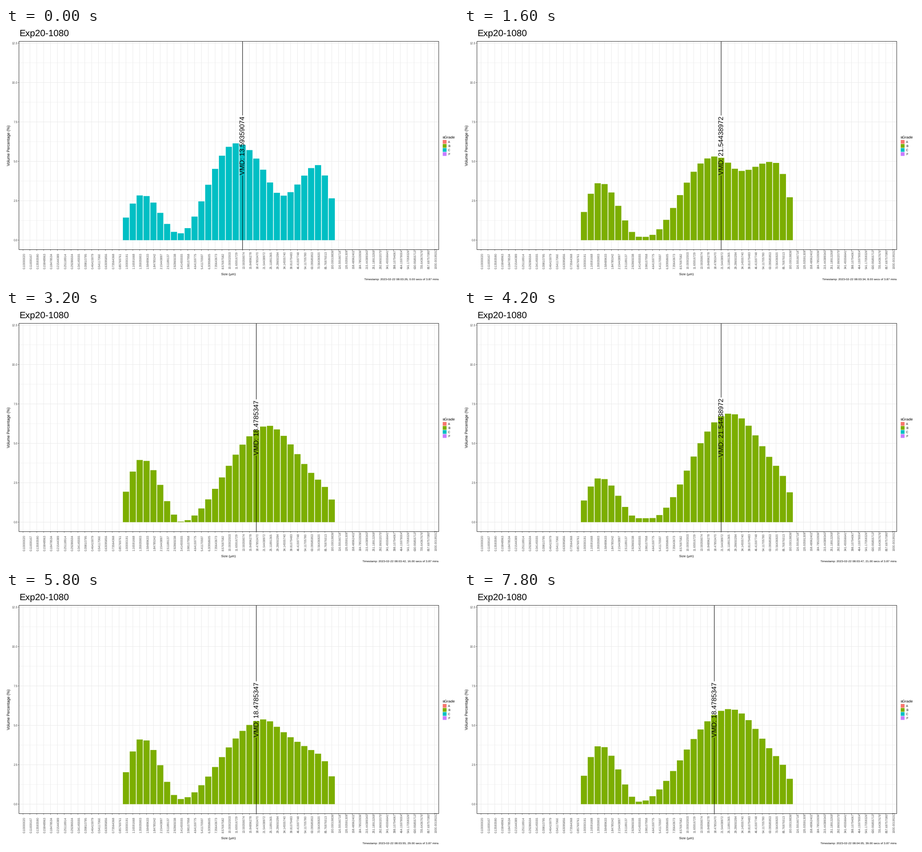
Recreate the animation shown at these times as a matplotlib script. Size 998 px wide and 561 px high, loop 8000 ms.

```python
import numpy as np
import matplotlib.pyplot as plt
from matplotlib.animation import FuncAnimation
from matplotlib.patches import Rectangle

W, H, DPI = 998, 561, 100
PX = 72 / DPI                                   # points per pixel
LEFT, RIGHT, TOP, BOTTOM = 28.6, 955.5, 29.5, 489.5
STEP = (RIGHT - LEFT) / 61.2
MIDDLE = (TOP + BOTTOM) / 2
ZERO, UNIT = 468.6, 34.82
FIRST, BARS = 15, 31
GRADES = {"A": "#F8766D", "B": "#7CAE00", "C": "#00BFC4", "F": "#C77CFF"}

plt.rcParams["font.family"] = ["Liberation Sans", "DejaVu Sans"]
plt.rcParams["text.hinting"] = "none"

# Size classes: 15 per decade, kept in single precision
SIZES = np.float32(10 ** (np.arange(61) / 15 - 1) * (1 + 1.96e-6))

# second, fine peak, main peak, main centre, main reach, coarse peak, haze
KEYS = np.array([
    [0, 2.85, 6.13, 16.1, 9.0, 4.75, 0.4],
    [4, 4.00, 3.95, 17.2, 8.6, 8.10, 0.0],
    [12, 3.30, 7.17, 20.3, 11.3, 1.60, 0.4],
    [16, 4.00, 6.12, 20.8, 13.0, 2.60, 0.0],
    [21, 2.80, 6.88, 21.2, 12.0, 3.40, 0.25],
    [29, 4.15, 5.37, 20.2, 13.3, 3.15, 0.3],
    [39, 3.72, 6.03, 21.2, 13.7, 2.90, 0.15],
])


def lobe(peak, centre, left, right):
    """Raised-cosine hump reaching zero at centre - left and centre + right."""
    d = np.arange(BARS) - centre
    d = np.clip(d / np.where(d < 0, left, right), -1, 1)
    return peak * (1 + np.cos(np.pi * d)) / 2


def mix(fine, main, centre, reach, coarse, haze):
    total = (lobe(fine, 2.35, 4.6, 6.0)
             + lobe(main, centre, reach, 22.4 - 0.7 * centre)
             + lobe(coarse, 27.9, 6.8, 4.5))
    return np.hypot(total, haze)


SHAPES = np.array([mix(*key[1:]) for key in KEYS])

fig = plt.figure(figsize=(W / DPI, H / DPI), dpi=DPI, facecolor="white")
ax = fig.add_axes([0, 0, 1, 1])
ax.set(xlim=(0, W), ylim=(H, 0))
ax.axis("off")


def xpos(i):
    return LEFT + (0.6 + i) * STEP


def ypos(v):
    return ZERO - v * UNIT


def line(xs, ys, color, width, z):
    return ax.plot(xs, ys, color=color, lw=width * PX, zorder=z,
                   solid_capstyle="butt", snap=False)[0]


def box(x, y, w, h, **style):
    return ax.add_patch(Rectangle((x, y), w, h, snap=False, **style))


def text(x, y, s, size, ha="left", color="black", rot=0):
    return ax.text(x, y, s, fontsize=size * PX, ha=ha, va="baseline",
                   color=color, rotation=rot, rotation_mode="anchor", zorder=6)


# Grid, ticks and tick labels
for k in range(11):
    y = ypos(k * 1.25)
    major = k % 2 == 0
    line([LEFT, RIGHT], [y, y], "#ebebeb", 1 if major else 0.6, 1)
    if major:
        line([26.7, LEFT], [y, y], "#333333", 0.8, 1)
        text(26, y + 2.5, f"{k * 1.25:.1f}", 6.8, "right", "#4d4d4d")
for i, size in enumerate(SIZES):
    x = xpos(i)
    line([x, x], [TOP, BOTTOM], "#ebebeb", 1, 1)
    line([x, x], [BOTTOM, BOTTOM + 2], "#333333", 0.8, 1)
    text(x + 4.7, 532, f"{size:.8f}", 6.6, color="#4d4d4d", rot=90)
box(LEFT, TOP, RIGHT - LEFT, BOTTOM - TOP, fill=False, ec="#333333", lw=PX,
    zorder=5)

# Titles and legend
text(29, 19, "Exp20-1080", 20.4)
text(491.5, 545.5, "Size (µm)", 7.5, "center")
text(9.6, MIDDLE, "Volume Percentage (%)", 8.57, "center", rot=90)
text(964, 244, "sGrade", 8.5)
for k, (name, color) in enumerate(GRADES.items()):
    y = 247.3 + 9 * k
    box(964.3, y, 8.4, 8.2, fc=color, lw=0)
    text(976, y + 6.7, name, 6.6)

# Moving parts
bars = [box(xpos(FIRST + i) - 0.45 * STEP, ZERO, 0.9 * STEP, 0, lw=0, zorder=3)
        for i in range(BARS)]
upper = line([0, 0], [0, 0], "black", 1, 4)
lower = line([0, 0], [0, 0], "black", 1, 4)
vmd = text(0, MIDDLE, "", 15, "center", rot=90)
stamp = text(955.5, 556.5, "", 6.47, "right")


def update(sec):
    heights = np.array([np.interp(sec, KEYS[:, 0], col) for col in SHAPES.T])
    color = GRADES["C" if sec < 8 else "B"]
    for b, h in zip(bars, heights):
        b.set_y(ypos(h))
        b.set_height(h * UNIT)
        b.set_facecolor(color)

    # Median class: the running volume reaches 50 percent here
    mid = FIRST + int(np.searchsorted(heights.cumsum(), 50))
    label = "VMD: " + f"{SIZES[mid]:.8f}".rstrip("0")
    x, gap = xpos(mid), 4.15 * len(label)
    upper.set_data([x, x], [TOP, MIDDLE - gap])
    lower.set_data([x, x], [MIDDLE + gap, BOTTOM])
    vmd.set_text(label)
    vmd.set_x(x + 4.8)

    clock = 3 * 60 + 26 + sec
    stamp.set_text(f"Timestamp: 2023-02-22 08:{clock // 60:02d}:{clock % 60:02d}, "
                   f"{sec:.2f} secs of 3.87 mins")
    return [*bars, upper, lower, vmd, stamp]


anim = FuncAnimation(fig, update, frames=40, interval=200, repeat=True,
                     repeat_delay=0, init_func=lambda: update(0))
plt.show()
```
